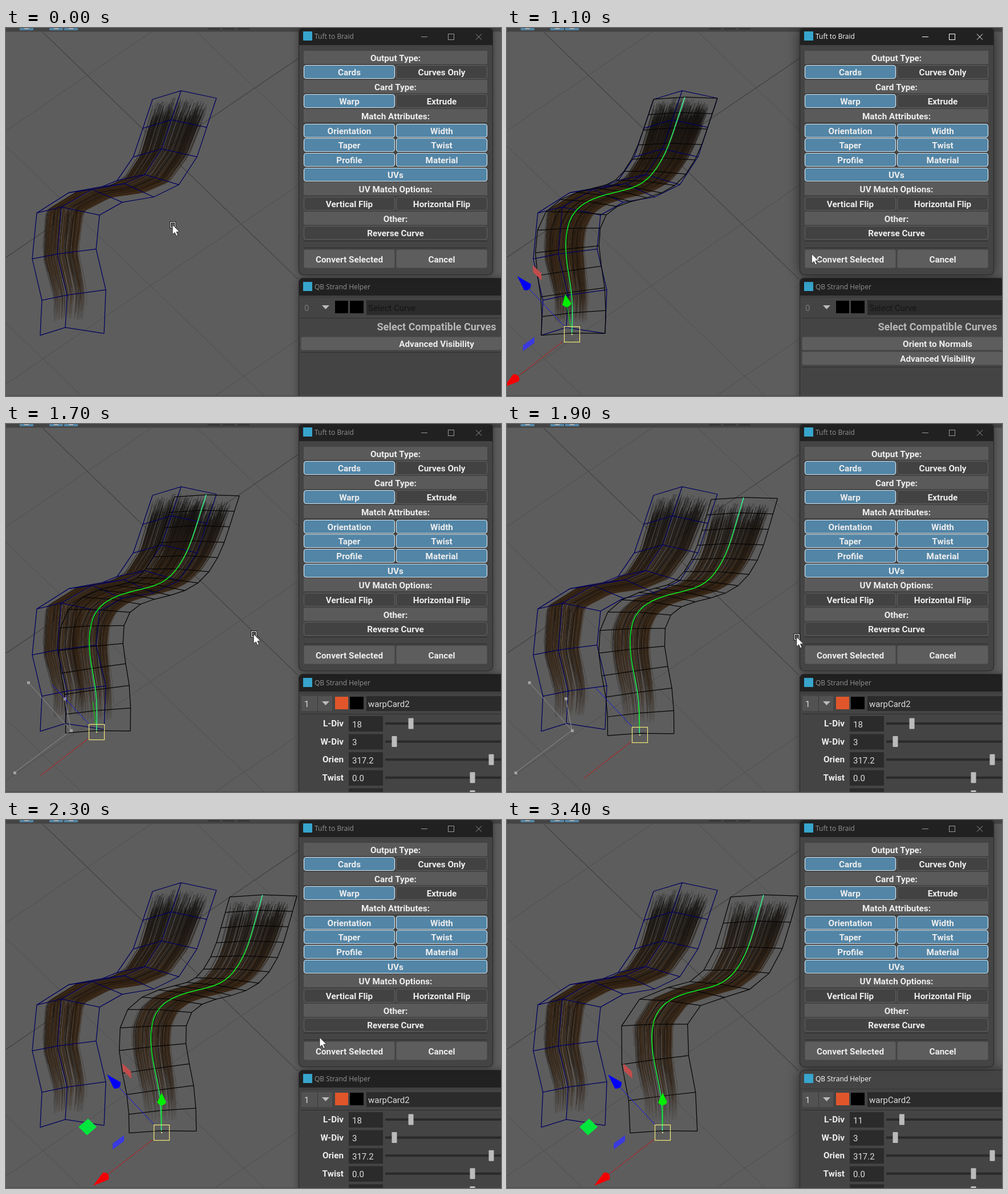
These frames come from a looping animation (868 by 645 pixels, 3900 ms). An HTML page with a canvas:

```html
<!DOCTYPE html>
<html lang="en">
<head>
<meta charset="utf-8">
<title>Hair strip conversion</title>
<style>
  html, body { margin: 0; width: 100%; height: 100%; overflow: hidden; background: #5d5d5d; }
  canvas { display: block; }
</style>
</head>
<body>
<canvas id="stage" width="868" height="645"></canvas>
<script>
const ctx = document.getElementById('stage').getContext('2d');
const LOOP = 3900, STEP = 100;
const BOLD = 'bold 15.3px Roboto, sans-serif';
const PLAIN = '15px Roboto, sans-serif';
const TITLE = '12px "Open Sans", sans-serif';

// Steps at which something happens.
const SELECT = 2, CONVERT = 11, EDIT = 14, GRAB = 17, RELEASE = 23, SLIDE = 27, LEAVE = 34;

const lerp = (a, b, f) => a + (b - a) * f;
const mix = (p, q, f) => [lerp(p[0], q[0], f), lerp(p[1], q[1], f)];
const clamp = f => Math.max(0, Math.min(1, f));
const easeOut = f => 1 - (1 - clamp(f)) ** 1.5;
const bump = (x, center, width) => Math.exp(-(((x - center) / width) ** 2));
const range = (n, make) => Array.from({ length: n }, (_, i) => make(i));

let seed = 7;
const random = () => (seed = seed * 16807 % 2147483647) / 2147483647;

// ---- geometry of the hair strips ----

const spine = [[313, 124], [296, 175], [279, 226], [249, 271], [214, 287],
               [157, 297], [109, 326], [102, 396], [119, 468], [116, 537]];

// Three columns (left, middle, right); ridge lifts the middle one.
function strip(ridge) {
  return [-1, 0, 1].map(side => spine.map(([x, y], r) => side
    ? [x + side * (56 - 13 * bump(r, 4.4, 1)),
       y + side * (11 * bump(r, 4.4, 1.5) - 11 * bump(r, 7.5, .9) - 1)]
    : [x - ridge * (r > 5 ? 12 : 6), y - ridge * (14 - 18 * bump(r, 7.5, 1))]));
}
const oldStrip = strip(1), flatStrip = strip(.2);

// Cubic B-spline that starts and ends on the outer points.
function spline(points, t) {
  const last = points.length - 1, i = Math.min(Math.floor(t * last), last - 1), f = t * last - i;
  const at = k => k < 0 ? mix(points[1], points[0], 2)
    : k > last ? mix(points[last - 1], points[last], 2) : points[k];
  const weights = [(1 - f) ** 3, 3 * f ** 3 - 6 * f * f + 4, 1 + 3 * f + 3 * f * f - 3 * f ** 3, f ** 3];
  return [0, 1].map(n => weights.reduce((sum, w, k) => sum + w / 6 * at(i + k - 1)[n], 0));
}

// u runs 0..2 across the columns, t runs 0..1 along them.
function surface(columns, u, t) {
  const last = columns[0].length - 1, r = Math.min(Math.floor(t * last), last - 1);
  const c = u < 1 ? 0 : 1;
  const along = n => mix(columns[n][r], columns[n][r + 1], t * last - r);
  return mix(along(c), along(c + 1), u - c);
}

const shades = ['16,12,9', '46,31,17', '72,49,27'].map(rgb => {
  const g = ctx.createLinearGradient(0, 115, 0, 530);
  g.addColorStop(0, 'rgba(18,18,18,.3)');
  g.addColorStop(.1, 'rgba(18,16,14,.5)');
  g.addColorStop(.4, `rgba(${rgb},.55)`);
  g.addColorStop(.75, `rgba(${rgb},.45)`);
  g.addColorStop(1, `rgba(${rgb},.04)`);
  return g;
});
const strands = range(290, () => ({
  side: (random() * 2 - 1) * (.8 + .2 * random()),
  drift: (random() - .5) * .24,
  start: .02 + .09 * random(),
  end: .97 - .4 * random() ** 2,
  shade: shades[Math.floor(random() * 3)]
}));

// ---- drawing helpers ----

function trace(points) {
  ctx.beginPath();
  points.forEach(p => ctx.lineTo(...p));
}
function line(points, color, width = 1) {
  trace(points);
  ctx.strokeStyle = color;
  ctx.lineWidth = width;
  ctx.stroke();
}
function fill(points, color) {
  trace(points);
  ctx.fillStyle = color;
  ctx.fill();
}
function rect(x, y, w, h, color) {
  ctx.fillStyle = color;
  ctx.fillRect(x, y, w, h);
}
function frame(x, y, w, h, color, width = 1.2) {
  ctx.strokeStyle = color;
  ctx.lineWidth = width;
  ctx.strokeRect(x, y, w, h);
}
function box(x, y, w, h, color, border, radius = 3) {
  ctx.beginPath();
  ctx.roundRect(x + .5, y + .5, w - 1, h - 1, radius);
  ctx.fillStyle = color;
  ctx.fill();
  if (!border) return;
  ctx.strokeStyle = border;
  ctx.lineWidth = 1.2;
  ctx.stroke();
}
function text(str, x, y, font = BOLD, color = '#eee', align = 'center') {
  ctx.font = font;
  ctx.fillStyle = color;
  ctx.textAlign = align;
  ctx.fillText(str, x, y);
}

// ---- viewport ----

function drawBackground() {
  rect(0, 0, 868, 645, '#5d5d5d');
  const gridLine = (start, gap, slope, n) => {
    const y = start + gap * n + 8 * (n ** 3 - n);
    line([[0, y], [512, y + 512 * slope]], n ? '#4e4e4e' : '#414141', n ? 1 : 1.2);
  };
  for (let n = -1; n <= 2; n++) {
    gridLine(-55, 262, .967, n);
    gridLine(402, 222, -.68, n);
  }
  rect(0, 0, 868, 6, '#444');
  rect(0, 6, 868, 1, '#505050');
  for (const x of [24, 76, 102]) {
    rect(x, 0, 24, 4, '#5285a6');
    rect(x + 8, 0, 8, 2, '#aaa');
  }
  for (let x = 354; x < 420; x += 26) rect(x, 0, 21, 3, '#363636');
  rect(0, 644, 512, 1, '#4a4a4a');
}

function drawHair(columns) {
  for (const s of strands) line(range(29, i => {
    const t = lerp(s.start, s.end, i / 28);
    return surface(columns, 1 + s.side * lerp(.92, .5, t) + s.drift * (t - .4), t);
  }), s.shade);
}
function drawWire(columns, color) {
  columns.forEach(c => line(c, color, 1.25));
  columns[0].forEach((_, r) => line(columns.map(c => c[r]), color, 1.25));
}
function drawGuide(column) {
  const g = ctx.createLinearGradient(0, 130, 0, 550);
  ['#3fffa0', '#0cf01c', '#0cf030', '#3fffa0'].forEach((color, i) => g.addColorStop(i / 3, color));
  line(range(61, i => spline(column, i / 60)), g, 1.6);
}

function drawAxis([x, y], [dx, dy], color, lineColor, withCone) {
  const length = Math.hypot(dx, dy), ux = dx / length, uy = dy / length;
  const at = (along, across) => [x + ux * along - uy * across, y + uy * along + ux * across];
  const base = length - 8 - .13 * length;
  line([at(length > 100 ? 20 : 14, 0), at(base, 0)], lineColor);
  if (!withCone) return;
  trace([at(length, 0), at(base, 8)]);
  ctx.quadraticCurveTo(...at(base - 10, 0), ...at(base, -8));
  ctx.fillStyle = color;
  ctx.fill();
}
function drawPlane([x, y], [cx, cy], [ax, ay], [bx, by], color) {
  fill([[-1, -1], [1, -1], [1, 1], [-1, 1]].map(([i, j]) =>
    [x + cx + i * ax + j * bx, y + cy + i * ay + j * by]), color);
}
function drawManipulator(center, greenTip, planeY, dragging) {
  const [x, y] = center;
  drawAxis(center, [-120, 93], '#f50000', '#c81414', !dragging);
  drawAxis(center, [-96, -102], '#0000f5', '#1414e6', !dragging);
  drawAxis(center, greenTip, '#00f000', '#00e000', !dragging);
  if (!dragging) {
    drawPlane(center, [-61, -108], [7.5, 7], [.5, 6.5], '#c24c4c');
    drawPlane(center, [-130, -10], [8.5, -7.2], [7.5, 7.2], '#00e63c');
    drawPlane(center, [-76, planeY], [10, -7.2], [0, 5.3], '#3a3ade');
  }
  frame(x - 13.5, y - 13.5, 27, 27, '#f0e878');
  rect(x - 1, y - 1, 2, 2, '#f0e878');
}
function drawGhost([x, y]) {
  for (const [dx, dy] of [[-75, -84], [-11, -56], [-99, 74], [0, 0]]) {
    line([[x, y], [x + dx, y + dy]], '#909090');
    rect(x + dx - 2, y + dy - 2, 5, 5, '#a0a0a0');
  }
}

// ---- windows ----

function drawWindow(x, y, w, h, title, active, barColor) {
  ctx.save();
  ctx.shadowColor = `rgba(0,0,0,${active ? .6 : .4})`;
  ctx.shadowBlur = active ? 22 : 14;
  box(x, y, w, h, '#444', null, 8);
  ctx.restore();
  ctx.beginPath();
  ctx.roundRect(x, y, w, 31, [8, 8, 0, 0]);
  ctx.fillStyle = barColor;
  ctx.fill();
  box(x, y, w, h, 'transparent', '#2c2c2c', 8);
  rect(521, y + 7, 16, 16, '#37a5cc');
  text(title, 541, y + 20, TITLE, active ? '#fff' : '#929292', 'left');
}

const dialogRows = [
  ['Output Type:'], ['Cards', 'Curves Only'],
  ['Card Type:'], ['Warp', 'Extrude'],
  ['Match Attributes:'], ['Orientation', 'Width'], ['Taper', 'Twist'], ['Profile', 'Material'], ['UVs'],
  ['UV Match Options:'], ['Vertical Flip', 'Horizontal Flip'],
  ['Other:'], ['Reverse Curve']
];
const unchecked = ['Curves Only', 'Extrude', 'Vertical Flip', 'Horizontal Flip', 'Reverse Curve'];

function drawDialog(active) {
  drawWindow(513, -1, 341, 434, 'Tuft to Braid', active, '#212121');
  const chrome = active ? '#fff' : '#999';
  rect(728, 15, 11, 1, chrome);
  frame(775.5, 10.5, 10, 10, chrome, 1);
  line([[824, 10.5], [834, 20.5]], chrome);
  line([[834, 10.5], [824, 20.5]], chrome);

  dialogRows.forEach((labels, i) => {
    const y = 51.8 + 25.64 * i, top = Math.round(y - 12.3);
    const w = labels.length > 1 ? 160 : 322;
    labels.forEach((label, k) => {
      const x = 522 + 162 * k, on = !unchecked.includes(label);
      if (label.endsWith(':')) rect(x, top, w, 23, '#5a5a5a');
      else box(x, top, w, 24, on ? '#5285a6' : '#424242', on ? '#d4e4ee' : '#5e5e5e', 4);
      text(label, x + w / 2, top + 17.5);
    });
  });
  [373, 385].forEach(y => rect(522, y, 322, 1, '#2c2c2c'));
  ['Convert Selected', 'Cancel'].forEach((label, k) => {
    box(522 + 162 * k, 388, 160, 33, '#5d5d5d');
    text(label, 602 + 162 * k, 411);
  });
}

const thumbX = divisions => 664.7 + 2.52 * divisions;

function drawPanel(active, selected, editing, divisions) {
  drawWindow(513, 438, 400, 240, 'QB Strand Helper', active, active ? '#444' : '#212121');
  rect(514, 471, 354, 1, '#363636');
  if (editing) {
    rect(518, 477, 54, 26, '#525252');
    rect(546, 477, 1, 26, '#3a3a3a');
  }
  text(editing ? '1' : '0', 523, 496, PLAIN, editing ? '#ddd' : '#777', 'left');
  fill([[554, 486], [567, 486], [560.5, 493]], '#bbb');
  rect(577, 478, 23, 22, editing ? '#e0562a' : '#000');
  rect(603, 478, 24, 22, '#000');
  rect(632, 477, 236, 26, '#2b2b2b');
  text(editing ? 'warpCard2' : 'Select Curve', 635, 495.5, PLAIN, editing ? '#ddd' : '#151515', 'left');
  rect(517, 508, 351, 1, '#303030');

  if (!editing) {
    text('Select Compatible Curves', 755, 529.5, 'bold 18px Roboto, sans-serif', '#b8b8b8');
    const labels = selected ? ['Orient to Normals', 'Advanced Visibility'] : ['Advanced Visibility'];
    labels.forEach((label, i) => {
      box(517, 541 + 26 * i, 370, 24, '#5d5d5d');
      text(label, 755, 558.5 + 26 * i);
    });
    rect(517, 542 + 26 * labels.length, 351, 1, '#303030');
    return;
  }
  [['L-Div', divisions, thumbX(divisions)], ['W-Div', 3, 681], ['Orien', '317.2', 851],
   ['Twist', '0.0', 818], ['', '', 818]].forEach(([label, value, thumb], i) => {
    const y = 525 + 31.6 * i;
    text(label, 592, y + 5, BOLD, '#eee', 'right');
    rect(601, y - 13, 60, 27, '#2b2b2b');
    text(value, 607, y + 6.5, PLAIN, '#ddd', 'left');
    rect(665, y - 2, 203, 4, '#2a2a2a');
    box(thumb - 5, y - 10, 10, 20, '#bbb', null, 1);
  });
}

// ---- pointer ----

const stops = [
  [0, 292, 345], [SELECT, 245, 285], [6, 591, 415], [9, 592, 408], [10, 592, 408], [15, 389, 365],
  [GRAB - 1, 389, 365], [21, 548, 376], [RELEASE, 550, 381], [SLIDE, 709, 526], [32, 693, 526], [33, 593, 553]
];
function pointerAt(step, divisions) {
  if (step >= SLIDE && step <= 32) return [thumbX(divisions) + 1, 526];
  const next = stops.findIndex(s => s[0] > step);
  if (next < 0) return stops.at(-1).slice(1);
  const [from, ...a] = stops[next - 1], [to, ...b] = stops[next];
  return mix(a, b, easeOut((step - from) / (to - from)));
}
function drawPointer([x, y], withBox) {
  if (withBox) {
    frame(x - 3.5, y - 4.5, 8, 9, '#000', 3);
    frame(x - 3.5, y - 4.5, 8, 9, '#fff');
  }
  const arrow = [[0, 0], [0, 17], [4, 13.5], [6.7, 19.5], [9.4, 18.3], [6.8, 12.4], [12, 12], [0, 0]]
    .map(p => [p[0] + x, p[1] + y]);
  fill(arrow, '#fff');
  line(arrow, '#222', .9);
}

// ---- animation ----

function draw(step) {
  const selected = step >= SELECT, converted = step >= CONVERT;
  const dragging = step >= GRAB && step < RELEASE;
  const drag = easeOut((step - GRAB + 1) / 5);
  const divisions = Math.round(18 - 7 * clamp((step - SLIDE) / 4) ** 1.5);

  drawBackground();
  drawHair(oldStrip);
  if (converted) {
    const placed = flatStrip.map((column, c) => column.map(([x, y]) =>
      [x + drag * (138 + .05 * (y - 120) + 3 * (c - 1)), y + drag * 10]));
    const rows = placed.map(column => range(divisions, i => spline(column, i / (divisions - 1))));
    drawHair(rows);
    drawWire(oldStrip, '#00005f');
    drawWire(rows, '#050505');
    drawGuide(placed[1]);
    const home = [114, 537];
    if (dragging) drawGhost(home);
    drawManipulator(mix(home, [273, 548], drag).map(Math.round), [lerp(-12, 0, drag), -70], 17, dragging);
  } else {
    drawWire(oldStrip, selected ? '#43ffa3' : '#00005f');
    if (selected) drawManipulator([219, 294], [-4, -95], -1, false);
  }

  drawPanel(step >= SLIDE, selected, step >= EDIT, divisions);
  drawDialog(converted && step < GRAB);

  const pointer = pointerAt(step, divisions);
  if (step < LEAVE) drawPointer(pointer, dragging || (pointer[0] < 512 && step < RELEASE));
}

let shown = -1;
function tick() {
  const step = Math.floor(performance.now() % LOOP / STEP);
  if (step !== shown) draw(shown = step);
  requestAnimationFrame(tick);
}
tick();
</script>
</body>
</html>
```
